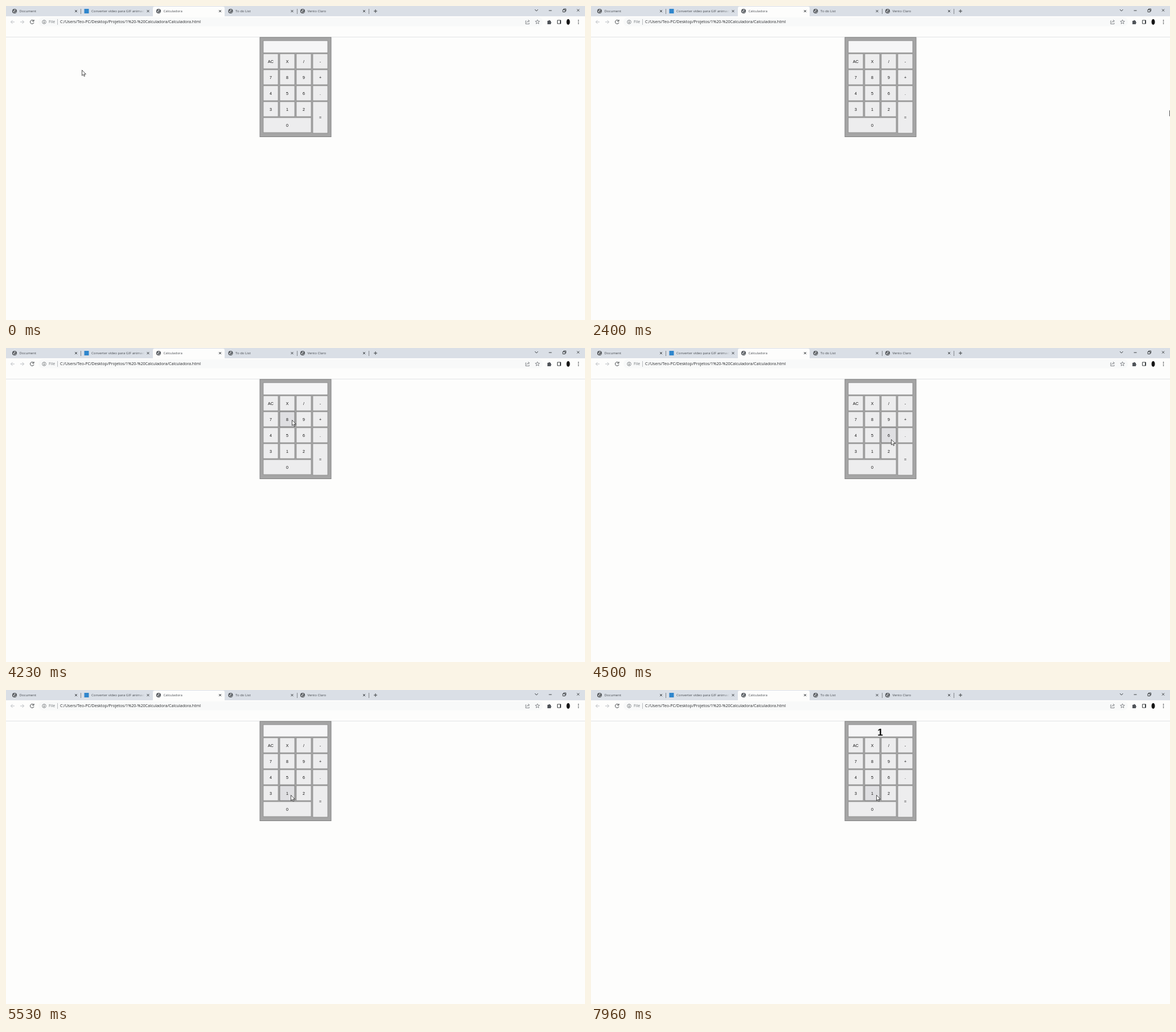
Recreate the animation shown at these times as an HTML page. Size 1017 px wide and 551 px high, loop 8000 ms.

```html
<!DOCTYPE html>
<html lang="pt">
<head>
<meta charset="utf-8">
<title>Calculadora</title>
<style>
html, body { margin: 0; width: 100%; height: 100%; overflow: hidden; background: #fdfdfc; }
svg { display: block; }
.ui { font-family: "Open Sans", sans-serif; font-size: 6.05px; fill: #45494e; }
.url { font-size: 7.08px; fill: #26282b; }
.key { font: 7.1px "Liberation Sans", Arial, sans-serif; text-anchor: middle; fill: #111; }
.result { font: bold 17px "Liberation Sans", Arial, sans-serif; text-anchor: middle; fill: #000; }
.line { fill: none; stroke: #3c4043; }
.soft { stroke: #6b6f74; stroke-width: .8; }
.pale { stroke: #b9bcc0; }
.cell { stroke: #7c7c7c; stroke-width: .6; }
</style>
</head>
<body>
<svg width="1017" height="551">
  <defs>
    <linearGradient id="fade">
      <stop stop-color="#dadfe6" stop-opacity="0"/>
      <stop offset=".5" stop-color="#dadfe6"/>
    </linearGradient>
    <g id="globe">
      <circle r="4.1" fill="#505459"/>
      <path d="M-3-1L-1 0 0 1-1 3ZM0-3L2-2 1-.7H-1ZM1 1H3L2 3Z" fill="#eceef0"/>
    </g>
    <path id="cross" class="line" d="M-2-2L2 2M2-2L-2 2"/>
    <path id="arrow" class="line pale" d="M3.5 0H-3M0-3L-3 0 0 3"/>
  </defs>

  <!-- Tab strip and window buttons -->
  <rect width="1017" height="18" fill="#dadfe6"/>
  <rect x="258" y="1" width="126" height="20" rx="3" fill="#fdfdfc"/>
  <g id="tabs" class="ui"></g>
  <path class="line soft" d="M131.5 5V14M511.5 5V14M637.5 5V14"/>
  <path class="line" d="M646 9H652M649 6V12M929 6L931.7 9 934.4 6M953.5 8H958.5M978 6.5H982V10.5H978ZM979.5 6.5V5H983.5V9H982"/>
  <use href="#cross" x="1005" y="7.5"/>

  <!-- Address bar -->
  <use href="#arrow" x="11.5" y="28"/>
  <use href="#arrow" transform="translate(28.5 28) scale(-1 1)"/>
  <path class="line" d="M48.5 26A3.3 3.3 0 1 0 49 29M49 24V26.8H46.2"/>
  <rect x="57" y="20" width="886" height="15.5" rx="7.7" fill="#f8f9f9"/>
  <circle class="line soft" cx="67" cy="28" r="3.3"/>
  <path class="line" d="M67 27.5V30M67 25.8V26.7"/>
  <path class="line pale" d="M90.5 23V33"/>
  <text class="ui" x="75" y="30.4" style="font-size:7px;fill:#70757a">File</text>
  <text class="ui url" x="95" y="30.4">C:/Users/Teo-PC/Desktop/Projetos/1%20-%20Calculadora/Calculadora.html</text>
  <path class="line soft" d="M914 26H912.8V31.5H919V29.5M914.5 29.5Q915 26.5 918.5 26.3M917 24.3L919.5 26.3 917 28.5"/>
  <path id="star" class="line soft"/>
  <path d="M951 26H953A1.3 1.3 0 0 1 955.6 26H957V28A1.3 1.3 0 0 1 957 30.5V32H951Z" fill="#505459"/>
  <path class="line" d="M968.5 25H974.5V31H968.5ZM973.5 25V31"/>
  <ellipse cx="987.5" cy="28" rx="3" ry="5" fill="#151515"/>
  <path d="M1005.5 25.2V31" stroke="#3c4043" stroke-width="1.7" stroke-linecap="round" stroke-dasharray="0 2.8"/>
  <rect y="54" width="1017" height="1" fill="#e2e3e4"/>

  <!-- Calculator -->
  <rect x="446" y="55" width="125" height="174.5" fill="#a5a5a5" stroke="#808080"/>
  <rect class="cell" x="452" y="61" width="113" height="21" fill="#f6f6f7"/>
  <text id="result" class="result" x="508" y="80">1</text>
  <g id="keys"></g>
  <path id="cursor" d="M0 0V9.6L2.2 7.6 3.7 11 5.2 10.3 3.7 7.1H6.8Z" fill="#fff" stroke="#222" stroke-width=".8"/>
</svg>
<script>
const $ = id => document.getElementById(id);

const titles = ["Document", "Converter vídeo para GIF animado", "Calculadora", "To do List", "Vento Claro"];
$("tabs").innerHTML = titles.map((title, i) => {
  const x = 15 + i * 126.5;
  const icon = i === 1
    ? `<rect x="${x - 4}" y="5" width="8" height="8" fill="#2f86cc"/>`
    : `<use href="#globe" x="${x}" y="9"/>`;
  const cover = i === 1 ? `<rect x="${x + 90}" y="3" width="24" height="13" fill="url(#fade)"/>` : "";
  return `${icon}<text x="${x + 8.5}" y="11.2">${title}</text>${cover}<use href="#cross" x="${x + 108}" y="9"/>`;
}).join("");

const starPoint = (_, i) => {
  const r = i % 2 ? 1.7 : 4, a = i * Math.PI / 5;
  return `${933.5 + r * Math.sin(a)} ${28 - r * Math.cos(a)}`;
};
$("star").setAttribute("d", `M${Array.from({ length: 10 }, starPoint).join("L")}Z`);

// Keys sit on a 4-column grid; two of them span several cells.
const makeKey = (label, col, row, w = 26, h = 26) =>
  ({ label, x: 452 + col * 29, y: 84 + row * 28, w, h });
const keys = ["AC", ..."X/-789+456.312"].map((label, i) => makeKey(label, i % 4, i >> 2));
keys.push(makeKey("=", 3, 3, 26, 55), makeKey("0", 0, 4, 84));
$("keys").innerHTML = keys.map(({ label, x, y, w, h }) =>
  `<rect class="cell" x="${x}" y="${y}" width="${w}" height="${h}"/>
   <text class="key" x="${x + w / 2}" y="${y + h / 2 + 2.5}">${label}</text>`
).join("");
const faces = $("keys").querySelectorAll("rect");

// Cursor moves: start time, end time, target x, target y
const start = [133, 112];
const moves = [
  [30, 530, 169, 206], [960, 1160, 179, 204], [1530, 1600, 181, 216],
  [1860, 2400, 1016, 183], [2400, 3360, 829, 69], [3360, 3500, 538, 115],
  [3530, 3760, 508, 60], [4060, 4230, 502, 126], [4230, 4860, 564, 212],
  [4860, 5030, 504, 194], [5030, 5530, 500, 184], [7930, 7960, 501, 184]
];

function cursorAt(t) {
  let [x, y] = start;
  for (const [from, to, tx, ty] of moves) {
    const k = Math.min(1, Math.max(0, (t - from) / (to - from)));
    const ease = k * k * (3 - 2 * k);
    x += (tx - x) * ease;
    y += (ty - y) * ease;
  }
  return [Math.round(x), Math.round(y)];
}

function draw(now) {
  const t = now % 8000;
  const [cx, cy] = cursorAt(t);
  $("cursor").setAttribute("transform", `translate(${cx + .5} ${cy + .5})`);
  $("result").setAttribute("visibility", t < 7200 ? "hidden" : "visible");
  keys.forEach(({ x, y, w, h }, i) => {
    const over = cx >= x && cx < x + w && cy >= y && cy <= y + h;
    faces[i].setAttribute("fill", over ? "#dfdfe2" : "#ededee");
    faces[i].style.stroke = over ? "#555" : "";
  });
  requestAnimationFrame(draw);
}
requestAnimationFrame(draw);
</script>
</body>
</html>
```
